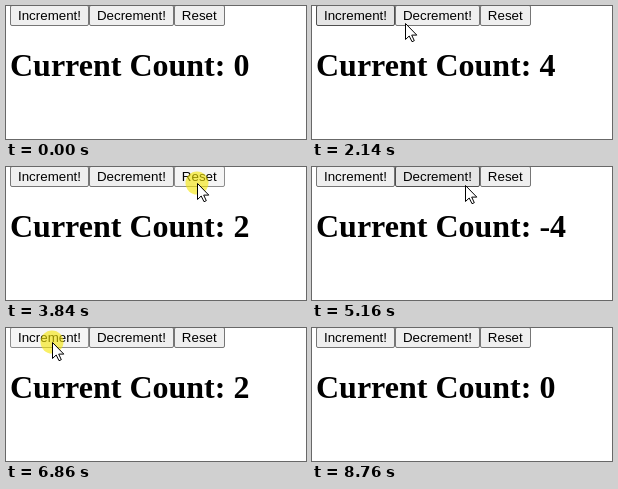
Animation, 300 px wide and 133 px high, one loop 9.54 s. Source, as an HTML page:

```html
<!DOCTYPE html>
<html lang="en">
<head>
<meta charset="utf-8">
<title>Counter</title>
<style>
  html, body { margin: 0; width: 100%; height: 100%; overflow: hidden; background: #fff; }
  #stage { position: relative; width: 300px; height: 133px; overflow: hidden; color: #000; }
  #bar { position: absolute; left: 4px; top: -1px; display: flex; }
  .btn {
    box-sizing: border-box; height: 21px; padding: 2px 7px;
    border: 1px solid #767676; border-radius: 2px; background: #efefef;
    font: 13.333px/15px "Liberation Sans", Arial, sans-serif; white-space: nowrap;
  }
  .btn.hover { background: #e5e5e5; border-color: #4f4f4f; }
  .btn.active { background: #f5f5f5; border-color: #8d8d8d; }
  h1 {
    position: absolute; left: 4px; top: 41px; margin: 0; white-space: nowrap;
    font: bold 32px/36px "Liberation Serif", "Times New Roman", serif;
  }
  #pointer { position: absolute; left: 0; top: 0; overflow: visible; }
</style>
</head>
<body>
<div id="stage">
  <div id="bar">
    <div class="btn">Increment!</div>
    <div class="btn">Decrement!</div>
    <div class="btn">Reset</div>
  </div>
  <h1>Current Count: <span id="count">0</span></h1>
  <svg id="pointer" width="1" height="1">
    <circle id="glow" r="11.5" fill="#f5e600" fill-opacity=".6"/>
    <path d="M.5 .5V16.5L4.2 13L7 18.7L9.3 17.7L6.7 12.1H11.8Z" fill="#fff" stroke="#000"/>
  </svg>
</div>
<script>
const LOOP = 9540, START = 660, TICK = 112.5, LAST = 72;
const TRAVEL = 3, SAG = 3; // ticks per trip, dip of the path in px
const INC = 0, DEC = 1, RESET = 2;

// The pointer reaches (x, y) at tick `at`, then clicks a button n times from tick `press`.
const stop = (at, x, y, button = -1, press = at, n = 0, gap = 2) => ({
  at, x, y, button,
  presses: Array.from({ length: n }, (_, i) => Math.round(press + i * gap))
});

const stops = [
  stop(0, 70, 1),
  stop(4, 51, 7, INC, 5, 4),
  stop(14, 137, 17, DEC, 18, 2),
  stop(24, 191, 16, RESET, 28, 1),
  stop(32, 155, 14, DEC, 32, 4, 7 / 3),
  stop(42, 190, 14, RESET, 44, 1),
  stop(49, 47, 12, INC, 50, 4, 7 / 3),
  stop(60, 189, 14, RESET, 63, 1),
  stop(69, 220, 106),
  stop(71, 221, 115)
];

stops.forEach((s, i) => {
  const next = stops[i + 1];
  const done = s.presses.length ? s.presses.at(-1) + 1 : s.at;
  s.leave = next ? Math.max(done, next.at - TRAVEL) : LAST;
});

const $ = id => document.getElementById(id);
const buttons = [...document.querySelectorAll('.btn')];

// Each click nudges the resting hand slightly down and left.
function rest(s, k) {
  const n = s.presses.filter(p => p < k).length;
  return { x: s.x - n / 2, y: s.y + n };
}

function pointerAt(k) {
  if (k < 0 || k >= LAST) return null;
  const i = stops.findLastIndex(s => s.at <= k);
  const s = stops[i], next = stops[i + 1];
  const a = rest(s, k);
  if (!next || k <= s.leave) return a;
  const f = (k - s.leave) / (next.at - s.leave);
  return {
    x: a.x + (next.x - a.x) * f,
    y: a.y + (next.y - a.y) * f + SAG * Math.sin(Math.PI * f)
  };
}

function stateAt(k) {
  let count = 0, pressed = -1, hover = -1;
  for (const s of stops) {
    if (k >= s.at && k <= s.leave + 1) hover = s.button;
    for (const p of s.presses) {
      if (k === p) pressed = s.button;
      if (k > p) count = s.button === RESET ? 0 : count + (s.button === INC ? 1 : -1);
    }
  }
  return { count, pressed, hover };
}

function draw(k) {
  const { count, pressed, hover } = stateAt(k);
  const pos = pointerAt(k);
  buttons.forEach((b, i) => {
    b.className = 'btn' + (i === pressed ? ' active' : i === hover ? ' hover' : '');
  });
  $('count').textContent = count;
  $('glow').style.display = pressed < 0 ? 'none' : '';
  $('pointer').style.display = pos ? '' : 'none';
  if (pos) {
    $('pointer').style.transform = `translate(${Math.round(pos.x)}px, ${Math.round(pos.y)}px)`;
  }
}

let shown;
function frame() {
  const t = performance.now() % LOOP;
  const k = t < START ? -1 : Math.min(LAST, Math.floor((t - START) / TICK + 0.12));
  if (k !== shown) draw(shown = k);
  requestAnimationFrame(frame);
}
frame();
</script>
</body>
</html>
```
